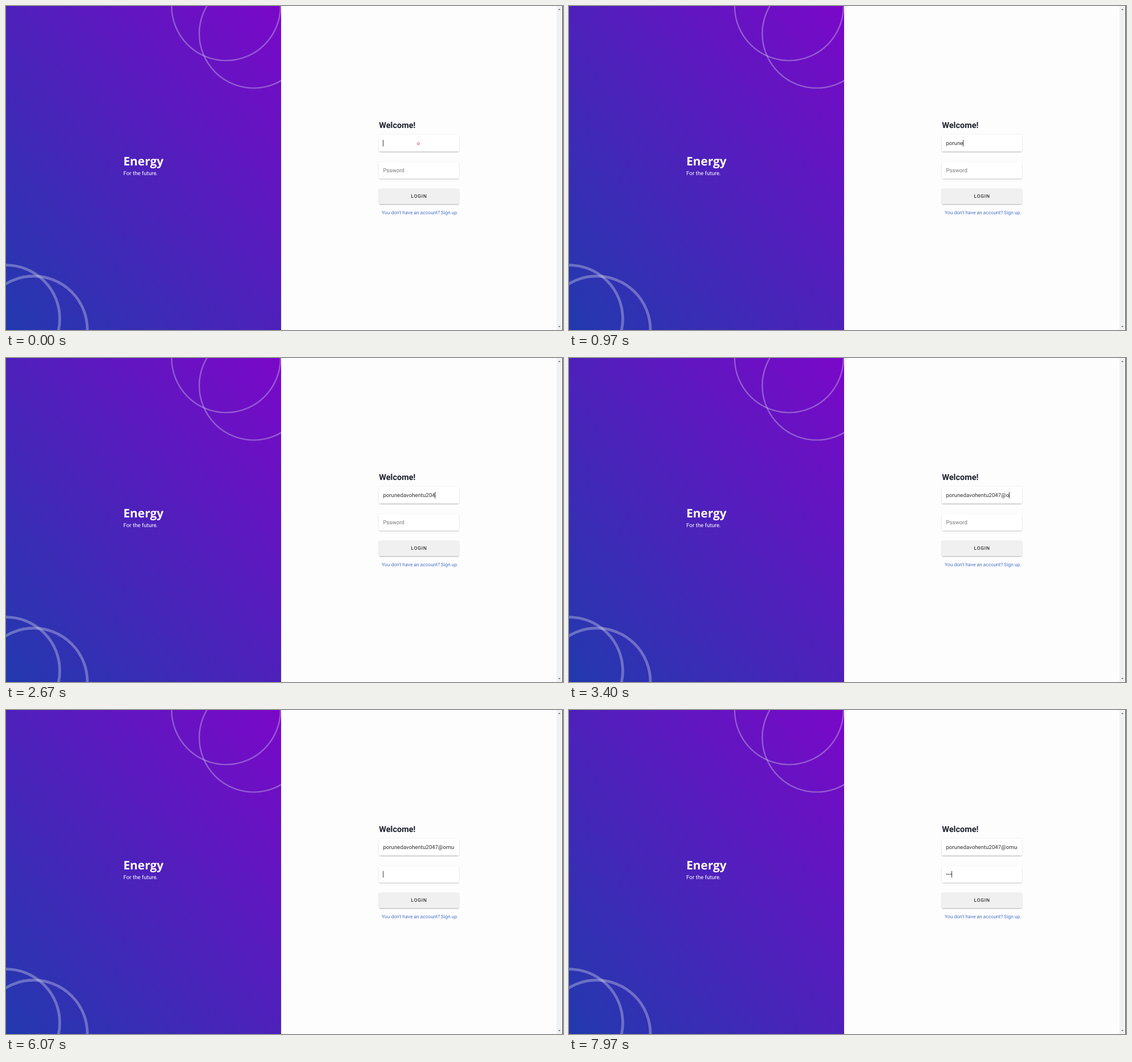
Animation, 980 px wide and 571 px high, one loop 8000 ms. Source, as an HTML page with a canvas:

```html
<!DOCTYPE html>
<html lang="en">
<head>
<meta charset="utf-8">
<title>Login</title>
<style>
  html, body { margin: 0; width: 100%; height: 100%; overflow: hidden; background: #fdfdfd; }
  canvas { display: block; }
</style>
</head>
<body>
<canvas id="stage" width="980" height="571"></canvas>
<script>
const ctx = document.getElementById('stage').getContext('2d');
const W = 980, H = 571, LOOP = 8000;
const SPLIT = 484.2;
const REM = 9.68; // one 16px text size at the page's zoom
const ROBOTO = 'Roboto, sans-serif';
const EMAIL = 'porunedavohentu2047@omud.test';
const FIELD = { x: 656, w: 141, left: 663.4, right: 789 };
const TAB_AT = 5650;

// Bursts of typing: [first key time, number of keys, time between keys]
const emailKeys = keyTimes([[330, 6, 115], [1010, 9, 95], [2090, 4, 235], [3200, 1, 0], [3390, 9, 118]]);
const passwordKeys = keyTimes([[7260, 3, 260]]);

function keyTimes(bursts) {
  return bursts.flatMap(([start, count, step]) =>
    Array.from({ length: count }, (_, i) => start + i * step));
}

function setFont(size, weight = 400, family = ROBOTO) {
  ctx.font = `${weight} ${size}px ${family}`;
}

function text(str, x, y, size, color, weight, family) {
  setFont(size, weight, family);
  ctx.fillStyle = color;
  ctx.fillText(str, x, y);
}

function ring(x, y, radius, width, color) {
  ctx.beginPath();
  ctx.arc(x, y, radius - width / 2, 0, Math.PI * 2);
  ctx.lineWidth = width;
  ctx.strokeStyle = color;
  ctx.stroke();
}

function drawPanel() {
  const diag = SPLIT * SPLIT + H * H;
  const dx = SPLIT * H * H / diag, dy = SPLIT * SPLIT * H / diag;
  const cx = SPLIT / 2, cy = H / 2;
  const fill = ctx.createLinearGradient(cx - dx, cy + dy, cx + dx, cy - dy);
  fill.addColorStop(0, '#2239ae');
  fill.addColorStop(1, '#7a08c8');

  ctx.save();
  ctx.beginPath();
  ctx.rect(0, 0, SPLIT, H);
  ctx.clip();
  ctx.fillStyle = fill;
  ctx.fillRect(0, 0, SPLIT, H);
  const line = 'rgba(229,231,235,.34)';
  ring(387.2, 0.3, 97, 2.42, line);
  ring(435.8, 48.8, 97, 2.42, line);
  ring(0, 551.2, 97, 4.84, line);
  ring(48.6, 570.6, 97, 4.84, line);
  ctx.restore();

  text('Energy', 206.4, 281.4, 20.9, '#fff', 700, '"Open Sans", sans-serif');
  text('For the future.', 206.6, 297.5, REM, '#fff');
}

function raisedBox(y, h, color) {
  const layers = [[0.6, 3, 0, 0.12], [1.2, 1.2, 0, 0.14], [1.8, 0.6, 1.2, 0.2]];
  ctx.fillStyle = color;
  for (const [offset, blur, inset, alpha] of [...layers, [0, 0, 0, 0]]) {
    ctx.shadowOffsetY = offset;
    ctx.shadowBlur = blur;
    ctx.shadowColor = `rgba(0,0,0,${alpha})`;
    ctx.beginPath();
    ctx.roundRect(FIELD.x + inset, y + inset, FIELD.w - 2 * inset, h - 2 * inset, 2.4);
    ctx.fill();
  }
}

function caretVisible(t, since) {
  return (t - since) % 1000 < 500;
}

function drawField(str, baseline, focused, showCaret) {
  setFont(REM);
  const width = ctx.measureText(str).width;
  const overflow = Math.max(0, FIELD.left + width + 0.8 - FIELD.right);
  const x = FIELD.left - (focused ? overflow : 0);
  ctx.save();
  ctx.beginPath();
  ctx.rect(FIELD.left - 0.4, baseline - 14, FIELD.right - FIELD.left + 0.4, 20);
  ctx.clip();
  text(str, x, baseline, REM, '#333');
  if (showCaret) {
    ctx.fillStyle = '#222';
    ctx.fillRect(x + width - 0.2, baseline - 9, 0.9, 11.5);
  }
  ctx.restore();
}

function drawForm(t) {
  const typed = emailKeys.filter(k => k <= t);
  const secret = passwordKeys.filter(k => k <= t);
  const onPassword = t >= TAB_AT;

  text('Welcome!', 656.2, 215, 14.52, '#1a202c', 700);
  raisedBox(227, 29.6, '#fff');
  raisedBox(275, 29.4, '#fff');
  raisedBox(322.2, 27, '#f0f0f0');

  drawField(EMAIL.slice(0, typed.length), 245, !onPassword,
    !onPassword && caretVisible(t, typed.at(-1) ?? 0));
  if (onPassword) {
    drawField('•'.repeat(secret.length), 292.8, true, caretVisible(t, secret.at(-1) ?? TAB_AT));
  } else {
    text('Pssword', FIELD.left, 293, REM, '#777');
  }

  ctx.letterSpacing = '0.76px';
  text('LOGIN', 712.6, 338.4, 8.47, '#333', 500);
  ctx.letterSpacing = '0px';
  text("You don't have an account? Sign up.", 661, 367, 8.47, '#4a72c8');

  if (t < emailKeys[0]) ring(725.5, 242.7, 2.4, 1, '#e5484d');
}

function arrow(y, dir) {
  ctx.beginPath();
  ctx.moveTo(971.3, y - dir);
  ctx.lineTo(975.7, y - dir);
  ctx.lineTo(973.5, y + dir * 1.3);
  ctx.fill();
}

function drawScrollbar() {
  ctx.fillStyle = '#f0f1f3';
  ctx.fillRect(968.5, 0, 10.5, H);
  ctx.fillStyle = '#707078';
  arrow(6, -1);
  arrow(565, 1);
  ctx.fillStyle = '#2b2b32';
  ctx.fillRect(979, 0, 1, H);
}

function frame(now) {
  ctx.fillStyle = '#fdfdfd';
  ctx.fillRect(0, 0, W, H);
  drawPanel();
  drawForm((now - start) % LOOP);
  drawScrollbar();
  requestAnimationFrame(() => frame(performance.now()));
}

ctx.textRendering = 'geometricPrecision';
const start = performance.now();
frame(start);
</script>
</body>
</html>
```
